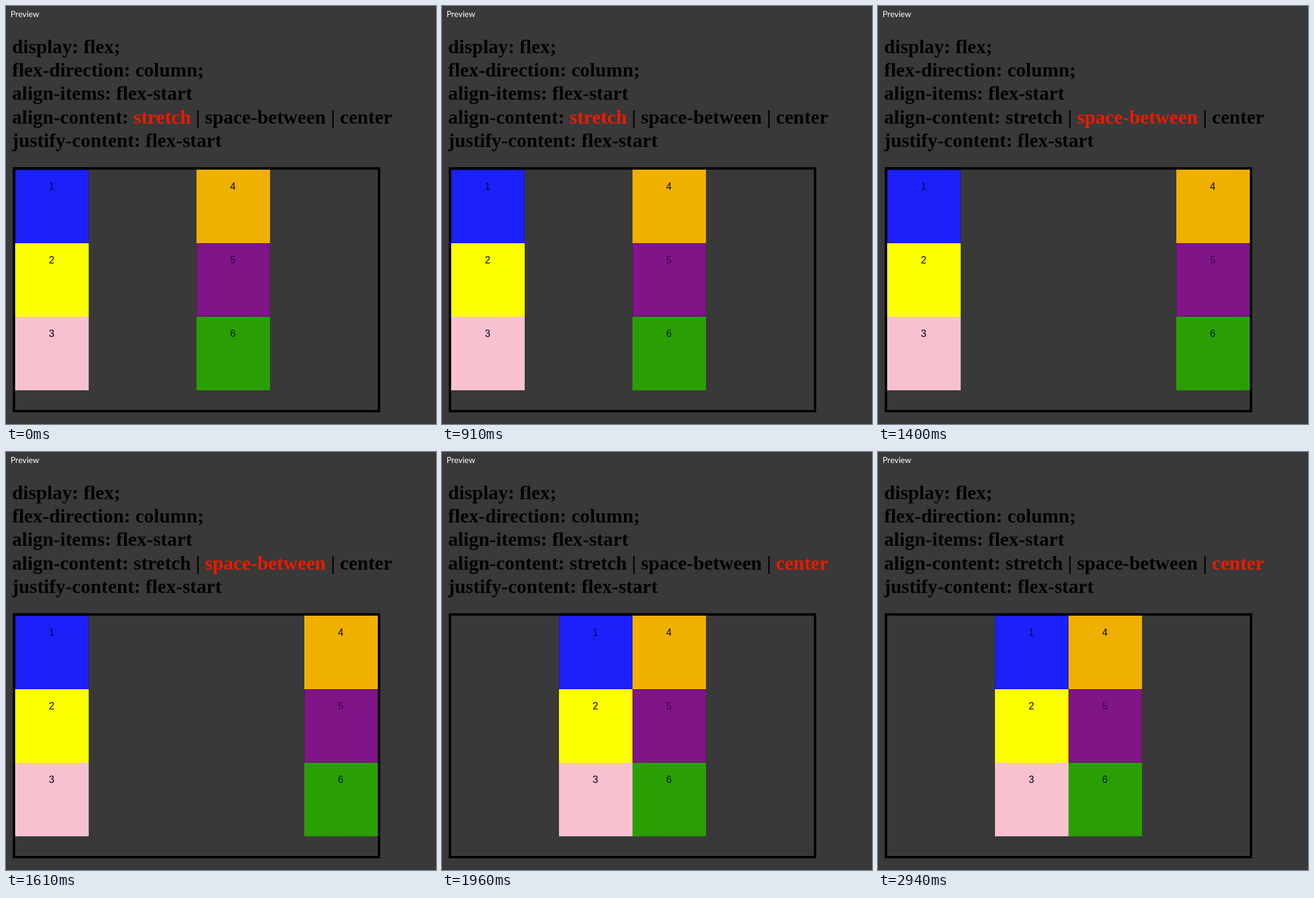
Write an HTML page with a canvas that moves like this. It is 702 px wide and 682 px high and loops after 3010 ms.

```html
<!DOCTYPE html>
<html lang="en">
<head>
<meta charset="utf-8">
<title>align-content</title>
<style>
  html, body { margin: 0; width: 100%; height: 100%; overflow: hidden; background: #393939; }
  canvas { display: block; }
</style>
</head>
<body>
<canvas id="stage" width="702" height="682"></canvas>
<script>
const ctx = document.getElementById('stage').getContext('2d');
const LOOP = 3010;
const BG = '#393939';
const RED = '#ea1a02';
const SERIF = 'bold 32px "Liberation Serif", Times, serif';
const SANS = '16px "Liberation Sans", Arial, sans-serif';
const LABEL = '13.3px Lato, sans-serif';
const SIZE = 120;
const TOP = 267;

// Start time and the left edges of both columns
const MODES = [
  { name: 'stretch', start: 0, cols: [15, 311] },
  { name: 'space-between', start: 980, cols: [15, 487] },
  { name: 'center', start: 1960, cols: [191, 311] }
];

const ITEMS = [
  { fill: '#1c20fa', edge: '#1616a4', ink: '#06064a' },
  { fill: '#fdff00', ink: '#000' },
  { fill: '#f8c1cf', ink: '#000' },
  { fill: '#f0b000', ink: '#000' },
  { fill: '#7f1587', edge: '#5c1462', ink: '#350a3a' },
  { fill: '#2a9f04', ink: '#041800' }
];

function write(text, x, y, color) {
  ctx.fillStyle = color;
  ctx.fillText(text, x, y);
  return x + ctx.measureText(text).width;
}

function drawRules(mode) {
  ctx.font = SERIF;
  ctx.textAlign = 'left';
  write('display: flex;', 10, 77, '#000');
  write('flex-direction: column;', 10, 115, '#000');
  write('align-items: flex-start', 10, 153, '#000');
  write('justify-content: flex-start', 10, 230, '#000');
  let x = write('align-content: ', 10, 192, '#000');
  MODES.forEach((m, i) => {
    if (i) x = write(' | ', x, 192, '#000');
    x = write(m.name, x, 192, m === mode ? RED : '#000');
  });
}

function drawItem(item, i, cols) {
  const x = cols[Math.floor(i / 3)];
  const y = TOP + (i % 3) * SIZE;
  ctx.fillStyle = item.fill;
  ctx.fillRect(x, y, SIZE, SIZE);
  if (item.edge) {
    ctx.strokeStyle = item.edge;
    ctx.lineWidth = 1;
    ctx.strokeRect(x + 0.5, y + 0.5, SIZE - 1, SIZE - 1);
  }
  write(String(i + 1), x + 59.5, y + 33, item.ink);
}

function draw(t) {
  const mode = MODES.filter(m => t >= m.start).pop();
  ctx.fillStyle = BG;
  ctx.fillRect(0, 0, 702, 682);

  ctx.font = LABEL;
  ctx.textAlign = 'left';
  write('Preview', 7.5, 18, '#fff');
  drawRules(mode);

  ctx.strokeStyle = '#000';
  ctx.lineWidth = 4;
  ctx.strokeRect(13, 265, 596, 396);

  ctx.font = SANS;
  ctx.textAlign = 'center';
  ITEMS.forEach((item, i) => drawItem(item, i, mode.cols));
}

const begin = performance.now();
function tick() {
  draw((performance.now() - begin) % LOOP);
  requestAnimationFrame(tick);
}
tick();
</script>
</body>
</html>
```
